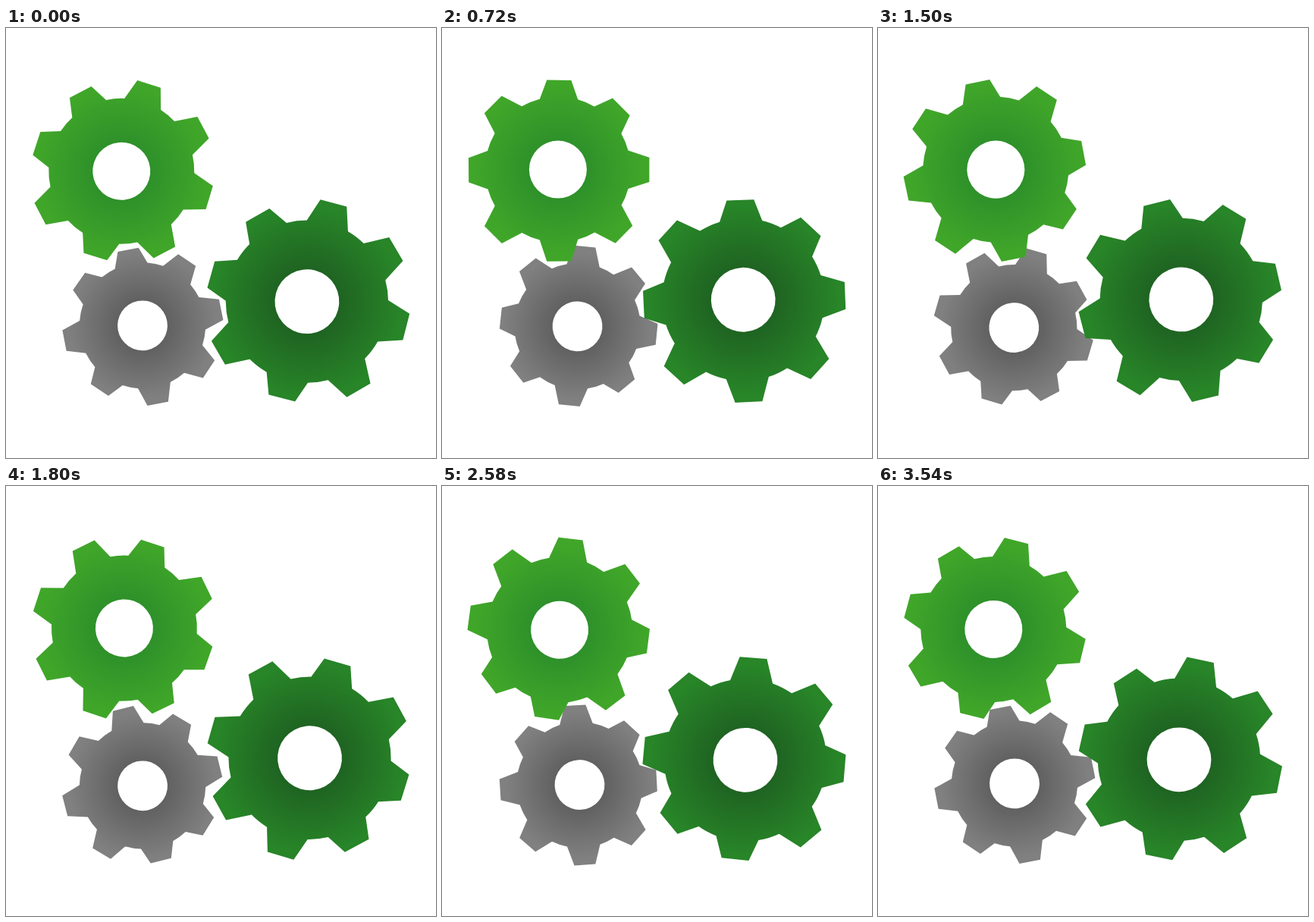
An HTML page with a canvas that plays this animation: 567 by 567 pixels, repeating every 3570 ms.

```html
<!DOCTYPE html>
<html lang="en">
<head>
<meta charset="utf-8">
<title>Gears</title>
<style>
  html, body { margin: 0; width: 100%; height: 100%; overflow: hidden; background: #fff; }
  canvas { display: block; }
</style>
</head>
<body>
<canvas id="stage" width="567" height="567"></canvas>
<script>
const ctx = document.getElementById('stage').getContext('2d');
const STEP = 30, STEPS = 119;
const RAD = Math.PI / 180;
const HOLE = 38, BODY = 96, BASE = 15.2 * RAD, HALF_TIP = 16.1;

// Slightly uneven teeth: [angle, tip distance]
const TEETH = [
  [0, 120.5], [44.4, 122.1], [89.2, 121], [134.7, 121.3],
  [179.5, 117.8], [224.9, 121.1], [270.6, 117.8], [315.1, 117.5]
];

// x, y: pivot; dx, dy: hole offset at the start; turn: degrees per step
const GEARS = [
  { x: 180, y: 393.8, dx: 0, dy: -1.5, scale: 0.866, start: 34.2, turn: -360 / 118,
    inner: '#616161', outer: '#808080' },
  { x: 154.1, y: 188.1, dx: -1.8, dy: 0.7, scale: 1, start: 17.5, turn: 360 / 119,
    inner: '#2e912a', outer: '#40a629' },
  { x: 398.7, y: 359.7, dx: -1.8, dy: 1, scale: 1.116, start: 15.1, turn: 360 / 119,
    inner: '#1f6422', outer: '#288528' }
];

function gearPath() {
  const path = new Path2D();
  for (const [deg, tip] of TEETH) {
    const a = deg * RAD, up = a - Math.PI / 2;
    const c = Math.cos(a), s = Math.sin(a);
    const corner = x => path.lineTo(x * c + tip * s, x * s - tip * c);
    path.arc(0, 0, BODY, up - BASE, up - BASE);
    corner(-HALF_TIP);
    corner(HALF_TIP);
    path.arc(0, 0, BODY, up + BASE, up + 45 * RAD - BASE);
  }
  path.closePath();
  path.moveTo(HOLE, 0);
  path.arc(0, 0, HOLE, 0, 2 * Math.PI);
  return path;
}

const shape = gearPath();
for (const g of GEARS) {
  g.fill = ctx.createRadialGradient(0, 0, HOLE, 0, 0, 112);
  g.fill.addColorStop(0, g.inner);
  g.fill.addColorStop(1, g.outer);
}

function drawGear(g, step) {
  const turned = g.turn * step * RAD;
  ctx.save();
  ctx.translate(g.x, g.y);
  ctx.rotate(turned);
  ctx.translate(g.dx, g.dy);
  ctx.rotate(g.start * RAD);
  ctx.scale(g.scale, g.scale);
  ctx.fillStyle = g.fill;
  ctx.fill(shape, 'evenodd');
  ctx.restore();
}

const begin = performance.now();

function draw(now) {
  const step = Math.floor(Math.max(0, now - begin) / STEP) % STEPS;
  ctx.fillStyle = '#fff';
  ctx.fillRect(0, 0, 567, 567);
  for (const g of GEARS) drawGear(g, step);
  requestAnimationFrame(draw);
}
draw(begin);
</script>
</body>
</html>
```
